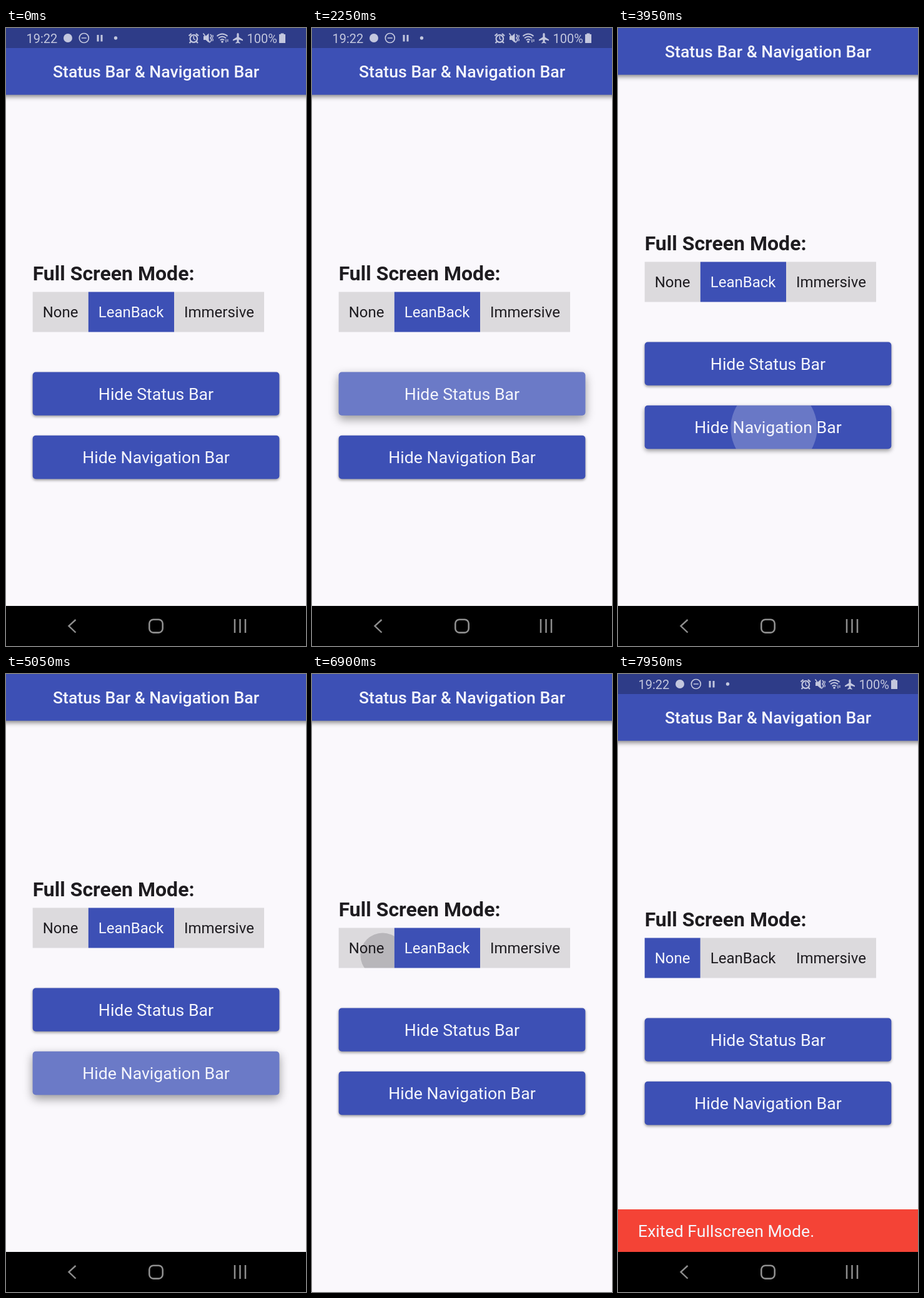
Recreate the animation shown at these times as an HTML page with a canvas. Size 480 by 987 pixels, loop 8000 ms.

```html
<!DOCTYPE html>
<html lang="en">
<head>
<meta charset="utf-8">
<title>Status Bar and Navigation Bar</title>
<style>
html, body { margin: 0; width: 100%; height: 100%; overflow: hidden; background: #faf8fc; }
canvas { display: block; }
</style>
</head>
<body>
<canvas id="stage" width="480" height="987"></canvas>
<script>
const c = document.getElementById('stage').getContext('2d');
const LOOP = 8000, BLUE = '#3d50b5', GREY = '#dcdadd', INK = '#1e1c20', LIGHT = '#f4f5fc';
const LEFT = 42.67, WIDTH = 394.67, BTN_H = 69.33;
// moments when the bars and the layout change
const HIDE_STATUS = 2640, HIDE_NAV = 5140, EXIT = 7740;

const ramp = (t, a, b) => Math.min(1, Math.max(0, (t - a) / (b - a)));
const smooth = p => p * p * (3 - 2 * p);
const mix = (a, b, p) => a + (b - a) * p;

// CSS "ease" curve: cubic-bezier(.25, .1, .25, 1)
function ease(x) {
  let lo = 0, hi = 1, u = x;
  for (let i = 0; i < 16; i++) {
    u = (lo + hi) / 2;
    const v = 1 - u;
    if (.75 * u * v * v + .75 * u * u * v + u ** 3 < x) lo = u; else hi = u;
  }
  return .3 * u * (1 - u) ** 2 + 3 * u * u * (1 - u) + u ** 3;
}

function text(str, x, y, size, color, weight = 400, align = 'left') {
  c.font = `${weight} ${size}px Roboto, sans-serif`;
  c.textAlign = align;
  c.fillStyle = color;
  c.fillText(str, x, y);
}

function rect(x, y, w, h, color) {
  c.fillStyle = color;
  c.fillRect(x, y, w, h);
}

function disc(x, y, r, color) {
  c.beginPath();
  c.arc(x, y, r, 0, 7);
  c.fillStyle = color;
  c.fill();
}

function line(d, width) {
  c.lineWidth = width;
  c.stroke(new Path2D(d));
}

function shadow(dy, blur, alpha) {
  c.shadowColor = `rgba(0,0,0,${alpha})`;
  c.shadowOffsetY = dy;
  c.shadowBlur = blur;
}

function button(label, y, t, press, release, touchX) {
  const lift = smooth(ramp(t, press, press + 200)) - smooth(ramp(t, release, release + 200));
  c.save();
  c.beginPath();
  c.roundRect(LEFT, y, WIDTH, BTN_H, 5);
  c.save();
  shadow(mix(2, 6, lift), mix(4, 15, lift), .4);
  c.fillStyle = BLUE;
  c.fill();
  c.restore();
  c.clip();
  const fade = ramp(t, press, press + 75) - ramp(t, release + 225, release + 375);
  if (fade > 0) {
    const p = ease(ramp(t, press, press + 1000));
    disc(mix(touchX, 240, p), y + 36, mix(61, 208, p), `rgba(255,255,255,${.24 * fade})`);
  }
  c.restore();
  text(label, 240, y + 44.5, 26.67, LIGHT, 400, 'center');
}

function toggles(y, t) {
  const chosen = t < EXIT ? 1 : 0;
  const edges = [LEFT, 131.8, 269, 413];
  ['None', 'LeanBack', 'Immersive'].forEach((label, i) => {
    const x = edges[i], w = edges[i + 1] - x;
    rect(x, y, w, 64, i === chosen ? BLUE : GREY);
    if (i === 0 && t > 6475 && t < EXIT) {
      c.save();
      c.beginPath();
      c.rect(x, y, w, 64);
      c.clip();
      disc(113, y + 43.5, 83.5 * ramp(t, 6475, 7475), 'rgba(30,28,32,.19)');
      c.restore();
    }
    text(label, x + 16, y + 40.5, 24, i === chosen ? LIGHT : INK);
  });
}

function statusBar(hidden) {
  if (hidden >= 1) return;
  const col = '#c3c7de';
  c.save();
  c.globalAlpha = 1 - hidden;
  c.translate(0, -32 * hidden);
  c.strokeStyle = col;
  text('19:22', 32.5, 23.5, 20, col);
  text('100%', 385.5, 23.5, 20, col);
  disc(99, 16, 7, col);
  line('M117.3 16a7.5 7.5 0 1 0 15 0a7.5 7.5 0 1 0-15 0M120.8 16h8', 1.7);
  rect(145.5, 11, 3, 10.5, col);
  rect(151.5, 11, 3, 10.5, col);
  disc(175.5, 16, 2.7, col);
  // alarm clock
  line('M294.5 17a5.8 5.8 0 1 0 11.6 0a5.8 5.8 0 1 0-11.6 0M292.5 12.5l4-3.5M308 12.5l-4-3.5M295.5 22l-2 2M305 22l2 2', 2.2);
  line('M300.3 13v4.3l2.6 1.5', 1.5);
  // muted speaker with vibration
  c.fillStyle = col;
  c.fill(new Path2D('M316 13h3.5l5-4.5v15l-5-4.5H316z'));
  line('M315.5 8.5l11 15M327 10l2 3-2 3 2 3-2 3', 1.6);
  line('M330.5 11l1 2-1.5 3 1.5 3-1 2', 1.2);
  // signal
  line('M337.5 13q8.5-7 17 0M340 16.3q6-5 12 0M342.7 19.4q3.3-2.7 6.6 0', 1.8);
  disc(346, 22, 1.8, col);
  line('M352 18v5M354.8 18v4', 1.3);
  // airplane
  c.fill(new Path2D('M371 8q1.6 0 1.6 2v4.5l6.4 4v2l-6.4-2v3.5l2 1.5v1.3l-3.6-1-3.6 1v-1.3l2-1.5v-3.5l-6.4 2v-2l6.4-4V10q0-2 1.6-2z'));
  // battery
  rect(439.5, 8.5, 5, 2.5, col);
  rect(437, 10, 10, 14, col);
  c.restore();
}

function navBar(hidden) {
  c.save();
  c.translate(0, 64 * hidden);
  rect(0, 923, 480, 64, '#000');
  c.strokeStyle = '#8e8e8e';
  line('M111.5 945L100.5 955L111.5 965.5', 2.4);
  line('M366 944v22M374.5 944v22M383 944v22', 2.5);
  c.beginPath();
  c.roundRect(229.3, 944.8, 21.4, 20.8, 6.5);
  c.lineWidth = 2.6;
  c.stroke();
  c.restore();
}

function draw(t) {
  const bars = t < HIDE_STATUS || t >= EXIT;
  const top = bars ? 32 : 0;
  const y = bars ? 421.5 : t < HIDE_NAV ? 373.5 : 405.5;
  const back = smooth(ramp(t, EXIT, EXIT + 160));

  rect(0, 0, 480, 987, '#faf8fc');
  text('Full Screen Mode:', LEFT, y - 18.5, 32, INK, 700);
  toggles(y, t);
  button('Hide Status Bar', y + 128, t, 1325, 2540, 255);
  button('Hide Navigation Bar', y + 229.33, t, 3880, 5040, 250);

  c.save();
  shadow(3, 7, .45);
  rect(-20, -20, 520, top + 94.67, BLUE);
  c.restore();
  text('Status Bar & Navigation Bar', 240, top + 47, 26.67, LIGHT, 500, 'center');

  const dark = t < EXIT ? 1 - ramp(t, HIDE_STATUS, HIDE_STATUS + 100) : back;
  rect(0, 0, 480, 32, `rgba(0,0,0,${.25 * dark})`);
  statusBar(smooth(ramp(t, HIDE_STATUS, HIDE_STATUS + 300)) - back);

  const rise = 1 - (1 - ramp(t, EXIT, EXIT + 210)) ** 3;
  if (rise > 0) {
    const snackY = 923 - 68 * rise;
    rect(0, snackY, 480, 68, '#f44336');
    text('Exited Fullscreen Mode.', 32, snackY + 43.5, 26.67, LIGHT);
  }
  navBar(smooth(ramp(t, HIDE_NAV, HIDE_NAV + 360)) - back);
}

function frame() {
  draw(performance.now() % LOOP);
  requestAnimationFrame(frame);
}
frame();
</script>
</body>
</html>
```
